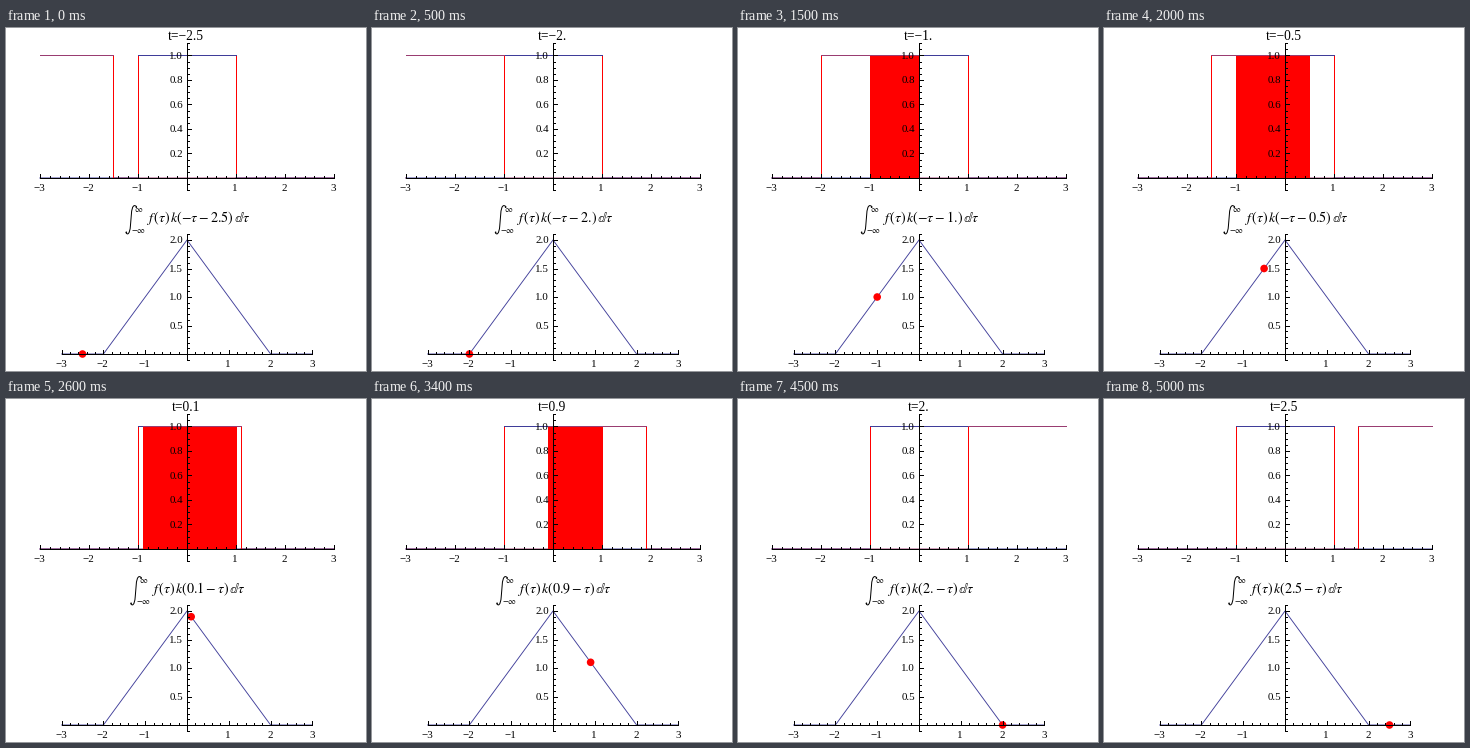
A matplotlib script for the animation above (5100 ms loop, 360x343 px).

```python
from itertools import accumulate, repeat

import numpy as np
import matplotlib.pyplot as plt
from matplotlib.animation import FuncAnimation
from matplotlib.collections import LineCollection
from matplotlib.patches import Circle, PathPatch, Rectangle
from matplotlib.path import Path

W, H, DPI = 360, 343, 64
PX = 72 / DPI                      # points per pixel
BLUE, PURPLE = (0.247, 0.24, 0.6), (0.6, 0.24, 0.443)
RED = (1, 0, 0)

plt.rcParams["font.family"] = "Liberation Serif"
plt.rcParams["mathtext.fontset"] = "stix"

# The running sum leaves a tiny rounding residue where t should be zero.
TIMES = list(accumulate(repeat(0.1, 50), initial=-2.5))

fig = plt.figure(figsize=(W / DPI, H / DPI), dpi=DPI, facecolor="white")
ax = fig.add_axes([0, 0, 1, 1])


class Plot:
    """Maps plot units to stage pixels and draws the axes."""

    def __init__(self, x0, y0, ux, uy):
        self.x0, self.y0, self.ux, self.uy = x0, y0, ux, uy

    def x(self, v):
        return self.x0 + self.ux * np.asarray(v)

    def y(self, v):
        return self.y0 - self.uy * np.asarray(v)

    def line(self, xs, ys, color, z=2, width=1.0, snap=None):
        ax.plot(self.x(xs), self.y(ys), color=color, lw=width * PX,
                zorder=z, snap=snap)

    def axes(self, low, high, step, split):
        """Axes with ticks; each y step is split into minor steps."""
        x0, y0 = self.x0, self.y0
        segs = [[(self.x(-3), y0), (self.x(3), y0)],
                [(x0, self.y(low)), (x0, self.y(high))]]
        for i in range(-15, 16):
            px = self.x(i / 5)
            segs.append([(px, y0), (px, y0 - (4 if i % 5 == 0 else 2))])
            if i % 5 == 0 and i:
                label = str(i // 5).replace("-", "\u2212")
                text(px - 0.7, y0 + 13, label, 11, ha="center")
        minor = step / split
        for i in range(round(low / minor), int(high / minor + 1e-6) + 1):
            py = self.y(i * minor)
            big = i % split == 0
            segs.append([(x0, py), (x0 + (4 if big else 2), py)])
            if big and i > 0:
                text(x0 - 4, py + 3.4, f"{i * minor:.1f}", 11, ha="right")
        ax.add_collection(LineCollection(segs, colors="black", linewidths=PX,
                                         capstyle="projecting", zorder=5))


def text(x, y, s, size, ha="left"):
    return ax.text(x, y, s, fontsize=size * PX, ha=ha, va="baseline", zorder=6)


def number(v):
    """Positive number: trailing dot for whole ones, powers of ten if tiny."""
    if v < 1e-6:
        mantissa, power = f"{v:.5e}".split("e")
        return rf"{mantissa}\times 10^{{{int(power)}}}"
    s = f"{v:.1f}"
    return s[:-1] if s.endswith(".0") else s


def draw_title(t, y):
    value = number(abs(t))
    if "times" in value:
        value = value.replace(r"\times", r"$\times") + "$"
    sign = "\u2212" if t < 0 else ""
    text(180.3, y, f"t={sign}{value}", 13.5, ha="center")


def draw_integral(t):
    value = number(abs(t))
    if value.endswith("."):
        value += r"\!"             # no gap after a trailing dot
    arg = rf"-\tau - {value}" if t < 0 else rf"{value} - \tau"
    body = text(0, 194,
                rf"$f\,(\tau)\,k({arg})\,\mathit{{\mathbb{{d}}}}\tau$", 14)
    width = body.get_window_extent().width * DPI / fig.dpi
    left = 181.5 - (22 + width) / 2
    body.set_x(left + 22)

    pts = [(1.5, 204.5), (3, 207.5), (5.4, 206), (6, 198), (7, 186),
           (7.5, 177.5), (10, 176), (12.3, 179)]
    codes = [Path.MOVETO] + [Path.CURVE4] * 3 + [Path.LINETO] + [Path.CURVE4] * 3
    curve = Path([(left + x, y) for x, y in pts], codes)
    ax.add_patch(PathPatch(curve, fill=False, lw=PX, zorder=6))
    for x, y in ((pts[0][0] + 0.4, 204.3), (pts[-1][0] - 0.4, 179.2)):
        ax.add_patch(Circle((left + x, y), 0.8, color="black", lw=0, zorder=6))
    text(left + 10, 184, r"$\infty$", 8.5)
    text(left + 6.5, 205, r"$-\infty$", 8.5)


def draw_box(plot, lo, hi, color):
    """Unit box on [lo, hi], zero elsewhere within the plot range."""
    lo, hi = max(lo, -3), min(hi, 3)
    plot.line([lo, hi], [1, 1], color, 3)
    plot.line([-3, lo], [0, 0], color, snap=False)
    plot.line([hi, 3], [0, 0], color, snap=False)
    for edge in (lo, hi):
        if abs(edge) < 2.99:
            plot.line([edge, edge], [0, 1], RED)


def draw_boxes(plot, t):
    a, b = max(t - 1, -1), min(t + 1, 1)
    if b - a > 0.01:
        ax.add_patch(Rectangle((plot.x(a), plot.y(1)), plot.ux * (b - a),
                               plot.uy, color=RED, lw=0, zorder=1))
    draw_box(plot, -1, 1, BLUE)
    draw_box(plot, t - 1, t + 1, PURPLE)


def update(i):
    t = TIMES[i]
    ax.clear()
    ax.set(xlim=(0, W), ylim=(H, 0))
    ax.axis("off")

    # A raised exponent makes the title taller, so the plot shrinks a little.
    scale = 0.985 if abs(t) < 1e-6 else 1
    top = Plot(180.9, 150, 49 * scale, 122.6 * scale)
    draw_title(t, 12 if scale == 1 else 13)
    draw_boxes(top, t)
    top.axes(-0.1, 1.1, 0.2, 4)

    draw_integral(t)
    low = Plot(181, 326, 41.8, 57)
    low.line([-3, -2, 0, 2, 3], [0, 0, 2, 0, 0], BLUE, width=0.9)
    ax.add_patch(Circle((low.x(t), low.y(max(0, 2 - abs(t)))), 3.8,
                        color=RED, lw=0, zorder=4))
    low.axes(-0.1, 2.1, 0.5, 5)
    return []


anim = FuncAnimation(fig, update, frames=len(TIMES), interval=100,
                     repeat=True, repeat_delay=0)
plt.show()
```
